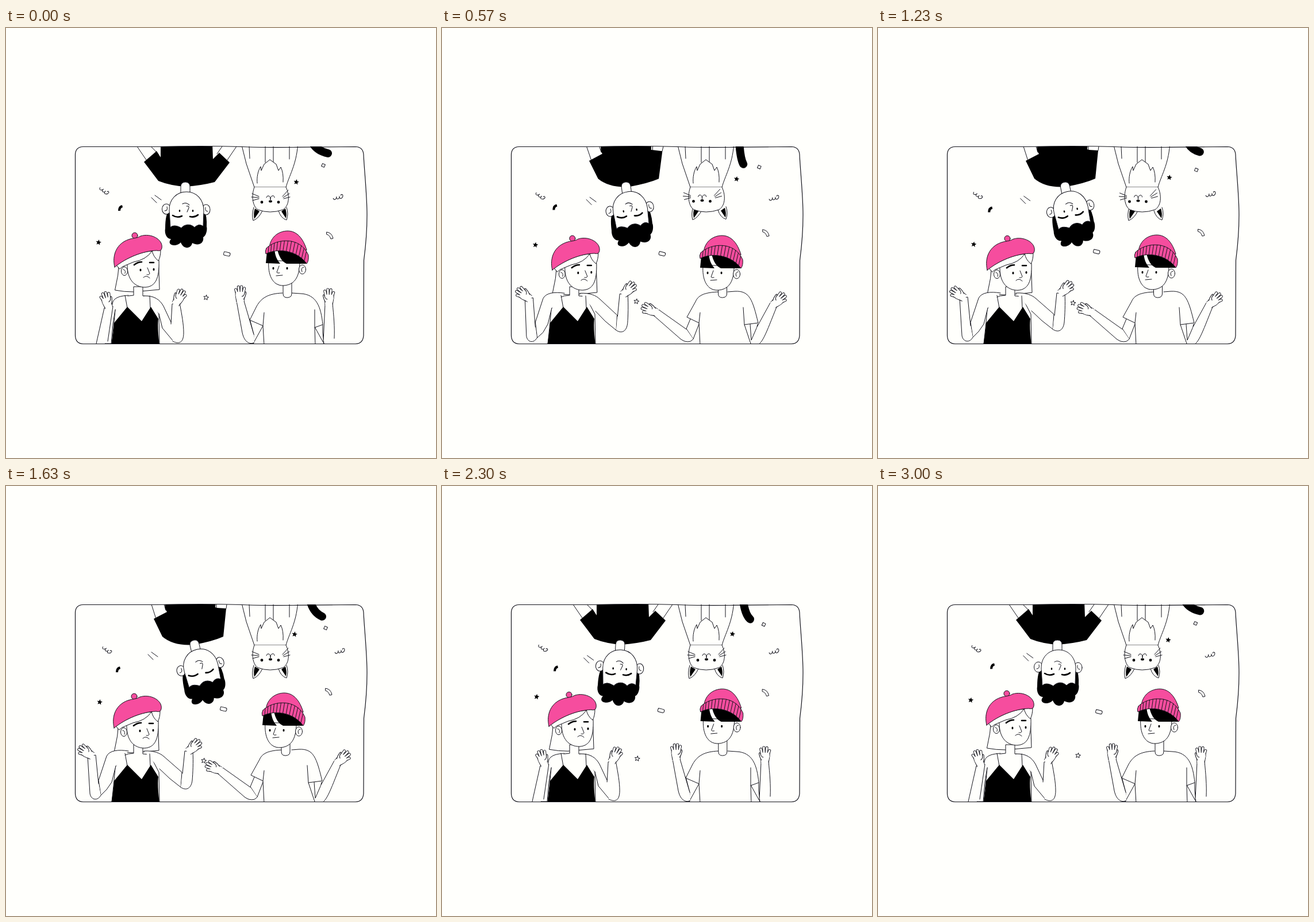
An HTML page that plays this animation: 748 px wide and 748 px high, repeating every 3030 ms.

```html
<!DOCTYPE html>
<html lang="en">
<head>
<meta charset="utf-8">
<title>Shrugging friends</title>
<style>
html, body { margin: 0; width: 100%; height: 100%; overflow: hidden; background: #fffffc; }
svg { display: block; width: 100vw; height: 100vh; }
.ln { fill: none; }
.sk { fill: #fffffc; }
.bk { fill: #000; stroke: none; }
.pk { fill: #f64d9e; }
.brow { fill: none; stroke: #000; stroke-width: 2.6; }
</style>
</head>
<body>
<svg viewBox="0 0 748 748" stroke="#14141c" stroke-width="1" stroke-linecap="round" stroke-linejoin="round">
<defs><clipPath id="panel"><rect x="120" y="206" width="510" height="343.500" rx="14"/></clipPath></defs>
<g id="scene" clip-path="url(#panel)"></g>
<path class="ln" stroke-width="1.2" d="M134 206.500H262Q340 204.500 410 206.500Q440 208 500 207.500L608 206.500Q621 207 622 220C623 245 628 290 628 325C628 360 625 385 622.500 404L622 535Q621 549 608 549.500H134Q121 549 120.500 535V220Q121 207 134 206.500Z"/>
</svg>
<script>
const LOOP = 3030;
const scene = document.getElementById('scene');
const $ = id => document.getElementById(id);
const p = (cls, d, id = '') => `<path class="${cls}" ${id && `id="${id}"`} d="${d}"/>`;
const dot = (x, y, rx, ry = rx, cls = 'bk') => `<ellipse class="${cls}" cx="${x}" cy="${y}" rx="${rx}" ry="${ry}"/>`;
const g = (id, inner) => `<g id="${id}">${inner}</g>`;

// Paths with two poses: [resting, shrugging]
const poses = {
  topArms: ['M228 206L245 231M252 206L262 216M376 206L367 219M401 206L384 231',
            'M253 206L261 231M275 206L278 216M366 206L366 212M384 206L383 213'],
  topShirt: ['M269 200L359 200L360 228L371 217L389 234L363 268Q340 274 312 276Q285 274 265 266L240 233L262 214L269 225Z',
             'M276 200L365 200L364 211L367 212L383 213L378 262Q360 270 328 276Q292 279 272 262L257 231L280 219L277 214Z'],
  galUpL: ['M213 465C200 466 190 468 186 476L178 510L172 549L183 549L186 515L190 490',
           'M213 461C195 458 180 460 175 470L161 512L165 538L175 528L184 515L191 487'],
  galForeL: ['M177 545L186 484L171 487L157 549C157 553 160 556 166 553',
             'M161 518L156 468L142 470L146 535C148 547 160 548 165 538'],
  galUpR: ['M240 466C258 465 268 473 274 484L289 516L292 546L272 522L266 497',
           'M240 461C258 460 268 465 274 470L306 498L304 524L285 509L267 492'],
  galForeR: ['M287 515L289 480L302 478C306 500 309 515 309 530C309 549 300 550 290 545',
             'M307 500L311 461L325 462C326 480 325 500 324 512C322 528 312 530 304 524'],
  boyUpL: ['M424 506L431 533L430 549L447 518', 'M433 504L425 523L437 541L447 515'],
  boyForeL: ['M431 533L414 475L401 475L411 530C415 548 425 551 432 547',
             'M425 524L377 490L367 499L415 541C423 547 432 548 437 541'],
  boyUpR: ['M551 516L551 530L553 549L537 520', 'M549 515L548 520L538 543L536 515'],
  boyForeR: ['M552 545L555 480L568 479C570 500 572 520 571 540C570 552 558 556 552 549',
             'M548 520L571 478L583 483L562 535C558 549 545 554 538 543'],
  boyShirt: ['M481 461C455 462 444 470 436 484L424 508L447 518L449 552L538 552L537 521L551 516C548 485 540 463 512 462L497 461',
             'M481 459C458 460 446 464 441 476L426 503L447 513L449 552L538 552L526 516L550 513C540 472 535 457 510 458L497 459'],
  boySides: ['M449 495L447 518M537 490L537 521', 'M449 495L447 513M524 486L526 516']
};
// Hands: wrist x, wrist y, angle for both poses, and the side of the thumb
const hands = {
  galHandL: [[178.500, 485, -18], [149, 469, -58], 1],
  galHandR: [[295.500, 479, 30], [318, 461, 50], -1],
  boyHandL: [[407.500, 475, -1], [372, 494.500, -68], 1],
  boyHandR: [[561.500, 480, 2], [577, 481, 49], -1]
};
const move = id => p('sk', poses[id][0], id);

function hand(id) {
  const fingers = [[-6, -22], [-2.200, -26.500], [2, -27], [6, -24]]
    .map(([x, y]) => `M${x * 0.9} -13L${x * 1.250} ${y + 2}`).join('');
  const inner =
    `<path d="${fingers}" fill="none" stroke-width="5"/>` +
    `<path d="${fingers}" fill="none" stroke="#fffffc" stroke-width="3.200"/>` +
    p('sk', 'M-6.500 1C-7 -4 -9 -8 -8 -16M8 -15C8 -10 7 -5 6.500 1') +
    `<path stroke="none" fill="#fffffc" d="M-6 3L-6 -2L-7.800 -9L-7.300 -16L7.300 -16L7.300 -9L6 3Z"/>` +
    p('sk', 'M6 -3Q9 -7 10.500 -14Q10 -18 8 -14Q7 -9 3 -8');
  return g(id, `<g transform="scale(${hands[id][2]} 1)">${inner}</g>`);
}

function bez(a, u) {
  const v = 1 - u;
  const at = i => (v * v * v * a[i] + 3 * v * v * u * a[i + 2] + 3 * v * u * u * a[i + 4] + u * u * u * a[i + 6]).toFixed(1);
  return at(0) + ' ' + at(1);
}

function ribs() {
  let d = '';
  for (let i = 1; i < 14; i++) {
    d += 'M' + bez([453, 383, 470, 366, 512, 362, 526, 395], i / 14) +
         'L' + bez([452, 393, 470, 383, 505, 385, 523, 410], i / 14);
  }
  return d;
}

function star(r) {
  const pts = [];
  for (let i = 0; i < 10; i++) {
    const a = i * Math.PI / 5 - 1.400, q = i % 2 ? r * 0.45 : r;
    pts.push((q * Math.cos(a)).toFixed(1) + ' ' + (q * Math.sin(a)).toFixed(1));
  }
  return 'M' + pts.join('L') + 'Z';
}

// Confetti: class, shape, positions at the key times
const squiggle = 'M-9 1Q-8 5 -5 3Q-3 1 -3 -1Q-4 4 0 3Q3 1 2 -1Q2 4 5 3Q9 1 8 -3Q5 -5 5 -2';
const keyTimes = [0, 330, 830, 1630, 2070, 2570];
const bits = [
  ['bk', star(5), [161, 373, 157, 378, 168, 376, 163, 376, 162, 369, 167, 366]],
  ['bk', star(5), [505, 268, 511, 264, 512, 262, 502, 258, 505, 255, 505, 262]],
  ['ln', star(4.600), [348, 469, 343, 473, 335, 478, 344, 478, 339, 477, 342, 471]],
  ['ln', squiggle, [171, 283, 171, 287, 172, 295, 176, 285, 177, 282, 174, 282], 42],
  ['ln', squiggle, [578, 294, 579, 298, 577, 292, 581, 287, 579, 288, 577, 288], -8],
  ['bk', 'M-4 5Q-4 -4 3 -5L4 -1Q0 0 0 5Z', [199, 313, 197, 312, 196, 312, 195, 319, 197, 318, 199, 316]],
  ['ln', 'M-5 -3H4Q6 -3 6 0T4 3H-4Q-6 3 -5 -3Z', [384, 393, 383, 394, 382, 391, 378, 388, 378, 391, 384, 390], 14],
  ['ln', 'M-3 -2L2 -3L3 2L-2 3Z', [552, 239, 552, 239, 552, 245, 556, 247, 559, 243, 559, 239], 35],
  ['ln', 'M-5 -6Q4 -5 6 5L2 6Q0 -1 -5 -2Z', [563, 361, 563, 359, 563, 355, 561, 358, 562, 360, 563, 359]],
  ['ln', 'M-9 -3L0 6M-3 -7L8 1', [262, 298, 262, 299, 258, 303, 256, 296, 256, 300, 256, 303]]
];

scene.innerHTML =
  bits.map((b, i) => g('bit' + i, p(b[0], b[1]))).join('') +
  // Tail and cat
  `<path id="tail" fill="none" stroke="#000" stroke-width="14"/>` +
  p('sk', 'M410 204L418 236L432 277L487 277C492 258 505 238 507.500 204') +
  p('ln', 'M423 206L424 227M451 206V234M465 206V234M493 206V228') +
  p('sk', 'M437 270C436 260 438 249 443 241L444 248L449 237L459 229L470 237L474 248L478 242Q483 252 482 268') +
  g('catEars',
    p('sk', 'M431 312Q427 325 430 335Q440 331 446 318') + p('bk', 'M433 314Q430 323 432 332L441 319Z') +
    p('sk', 'M474 318Q478 331 488 334Q492 323 488 312') + p('bk', 'M479 319L487 331Q489 323 486 314Z')) +
  p('sk', 'M432 277C427 290 428 309 438 316Q459 324 482 316C494 308 493 289 487 277') +
  g('catFace',
    dot(445, 303, 2.400) + dot(474, 303, 2.400) + dot(460, 301.500, 3, 2) +
    p('ln', 'M453 295Q454 291 457 292Q460 293 460 299Q460 293 463 292Q467 291 467 295') +
    p('ln', 'M428 288L440 293M427 294L440 295M429 300L440 297M481 293L491 282M482 295L493 288M483 297L494 294')) +
  // Upside-down friend
  move('topArms') + p('bk', poses.topShirt[0], 'topShirt') +
  g('topHead',
    p('sk', 'M304 290V276Q304 268 312 268Q320 268 320 276V290') +
    p('bk', 'M284 316Q277 324 277 348C275 360 281 367 287 367C278 378 296 382 304 373C309 386 322 384 324 374C335 380 345 374 343 364C350 360 350 347 349 346Q350 326 344 316Z') +
    dot(279, 315, 7.500, 9, 'sk') + dot(348, 316, 7, 9, 'sk') +
    p('sk', 'M284 318C283 298 297 285 314 285C332 285 344 299 344 318L343 345C338 341 333 342 328 347C320 339 310 342 305 348C298 344 291 342 286 347Z') +
    p('ln', 'M276 318Q282 318 280 311M351 319Q346 319 347 312M314 310Q319 309 318 313L315 320M307 306Q313 302 319 308') +
    p('brow', 'M290 326Q298 331 306 327M320 328Q328 330 334 325') +
    g('topEyes', dot(302, 318, 1.300, 2) + dot(325, 318, 1.300, 2))) +
  // Friend with the beret
  g('galHair', p('sk', 'M197 405Q196 430 189.500 456Q205 459 222 459L245 457L267 455L265 395Z')) +
  p('sk', 'M213 466L222 465V450H238V466L250 467L266 498L267 550H184L188 512L190 490L197 472Z', 'galTorso') +
  move('galUpL') + move('galUpR') +
  p('ln', 'M207 465L211 487M250 466L251 487') +
  p('bk', 'M211 485L236 510L252 485L265 506Q263 520 267 552H183Q187 530 188 513Z') +
  move('galForeL') + move('galForeR') + hand('galHandL') + hand('galHandR') +
  g('galHead',
    p('sk', 'M211 410C210 438 224 451 242 451C260 450 267 436 266 404L255 388Z') +
    dot(206, 423, 5.500, 7.500, 'sk') + p('ln', 'M204 420Q209 421 207 427') +
    p('sk', 'M192 412C215 398 235 389 254 388Q244 403 222 407Q210 412 203 415L198 419Z') +
    p('sk', 'M254 387Q256 398 265 405Q269 398 269 386Z') +
    p('brow', 'M223 412Q229 407 236 407M250 408L257 408') +
    dot(234, 421, 1.500, 2.200) + dot(257, 420, 1.500, 2.200) +
    p('ln', 'M246 417L250 427Q249 430 245 429M239 434Q244 429 250 435') +
    dot(224, 361, 5, 5, 'pk') +
    p('pk', 'M189 416C184 394 193 375 213 368C221 365 228 366 234 362C252 356 274 368 271 383Q270 389 262 387C238 388 210 399 189 416Z')) +
  // Friend with the knitted cap
  move('boyUpL') + move('boyUpR') + move('boyForeL') + move('boyForeR') +
  hand('boyHandL') + hand('boyHandR') +
  move('boyShirt') + move('boySides') +
  `<path id="boyNeck" class="sk" d="M482 440V462Q482 469 489 469Q497 469 497 462V440"/>` +
  g('boyHead',
    p('sk', 'M457 405C455 428 463 449 483 448C500 447 511 436 511 406Z') +
    dot(515.500, 420, 6, 8, 'sk') + p('ln', 'M518 416Q512 417 515 424') +
    p('bk', 'M454 388L452 409L477 410C471 403 468 396 467 384Z') +
    p('bk', 'M472 384C474 398 481 407 488 410L522 410L526 398L500 384Z') +
    dot(465, 418, 1.500, 2.200) + dot(489, 418, 1.500, 2.200) +
    p('ln', 'M475 414L471 425Q472 427 476 426M470 431L481 430') +
    p('pk', 'M458 382C460 362 476 353 490 353C506 353 517 366 523 386Z') +
    p('pk', 'M453 383C470 366 512 362 526 395Q527 405 523 410C505 385 470 383 452 393Q450 388 453 383Z') +
    p('ln', ribs())) +
  g('burst', p('ln', 'M418 410Q426 412 428 419Q421 417 418 410ZM431 400Q436 403 436 410Q431 406 431 400ZM405 428Q413 427 418 432Q410 433 405 428Z'));

function mix(a, b, k) {
  const to = b.match(/-?\d+(\.\d+)?/g);
  let i = 0;
  return a.replace(/-?\d+(\.\d+)?/g, n => (+n + (to[i++] - n) * k).toFixed(2));
}

// Eased value from rows of [time, ...values]
function ease(rows, t) {
  let i = 0;
  while (i < rows.length - 2 && t >= rows[i + 1][0]) i++;
  const a = rows[i], b = rows[i + 1];
  const u = Math.min(1, Math.max(0, (t - a[0]) / (b[0] - a[0])));
  const s = u * u * (3 - 2 * u);
  return a.slice(1).map((v, j) => v + (b[j + 1] - v) * s);
}

// Smooth closed curve through values at given times
function drift(times, vals, period, t) {
  const n = times.length;
  const T = i => times[(i + n) % n] + Math.floor(i / n) * period;
  const V = i => vals[(i + n) % n];
  let i = n - 1;
  while (i > 0 && t < times[i]) i--;
  const d = T(i + 1) - T(i), u = (t - T(i)) / d;
  const m0 = (V(i + 1) - V(i - 1)) / (T(i + 1) - T(i - 1)) * d;
  const m1 = (V(i + 2) - V(i)) / (T(i + 2) - T(i)) * d;
  const u2 = u * u, u3 = u2 * u;
  return (2 * u3 - 3 * u2 + 1) * V(i) + (u3 - 2 * u2 + u) * m0 + (3 * u2 - 2 * u3) * V(i + 1) + (u3 - u2) * m1;
}

const tracks = {
  top: [[0, 0], [330, 0.2], [620, 1], [1680, 1], [2030, 0], [LOOP, 0]],
  gal: [[0, 0], [340, 0], [620, 1], [1880, 1], [2320, 0], [LOOP, 0]],
  boy: [[0, 0], [80, 0], [430, 1], [1680, 1], [2000, 0], [LOOP, 0]],
  topHead: [[0, 0, 0], [330, -2, 0.3], [650, 10, -9], [830, 11, -10], [1630, 16, -13], [2040, -4, 6.500], [2100, -4, 6.500], [2500, 0, 0], [LOOP, 0, 0]],
  galHead: [[0, 0, 0], [330, 1.800, 2.500], [650, 3, 5.500], [830, 3, 5.500], [1630, -1, 5], [2070, -3, 6.500], [2450, -3, 0], [2600, -3, 0], [LOOP, 0, 0]],
  boyHead: [[0, 0, 0], [80, 0, 0], [330, -2, 9], [830, -4, 7], [1630, -6, 7], [2000, -4, 0], [2570, -1, 0], [LOOP, 0, 0]],
  cat: [[0, 0, 0], [80, 0, 0], [330, 1, -2.500], [830, 1, 0], [1250, 1, 0], [1500, 0, 0], [LOOP, 0, 0]],
  blink: [[0, 1], [1540, 1], [1600, 0], [1660, 0], [1720, 1], [LOOP, 1]]
};
const set = (id, tf) => $(id).setAttribute('transform', tf);

function draw(t) {
  const at = name => ease(tracks[name], t);
  const part = { top: at('top')[0], gal: at('gal')[0], boy: at('boy')[0] };

  for (const id in poses) $(id).setAttribute('d', mix(...poses[id], part[id.slice(0, 3)]));
  for (const id in hands) {
    const [a, b] = hands[id], k = part[id.slice(0, 3)];
    const [x, y, r] = a.map((v, i) => v + (b[i] - v) * k);
    set(id, `translate(${x} ${y}) rotate(${r})`);
  }

  const [tx, turn] = at('topHead');
  set('topHead', `translate(${tx} 0) rotate(${turn} 312 276)`);
  set('topEyes', `translate(0 318) scale(1 ${at('blink')[0]}) translate(0 -318)`);
  const gal = at('galHead');
  set('galHair', `translate(${gal})`);
  set('galHead', `translate(${gal})`);
  set('boyHead', `translate(${at('boyHead')})`);
  set('boyNeck', `translate(${at('boyHead')[0] * 0.5} 0)`);

  const [look, lift] = at('cat');
  set('catFace', `translate(${-7.500 * look} ${-look + lift * 0.4})`);
  set('catEars', `translate(${6 * look} ${lift})`);

  // The tail swings twice per loop
  const phase = t / LOOP * 2 % 1;
  const swing = vals => drift([0, 0.076, 0.218, 0.366, 0.548, 0.696], vals, 1, phase);
  const ex = swing([560, 550, 535, 524, 539, 556]);
  const ey = swing([218, 227, 234, 237, 230, 217]);
  const rx = swing([533, 529, 522, 517, 526, 540]);
  $('tail').setAttribute('d', `M${rx} 199Q${rx + (ex - rx) * 0.25} ${199 + (ey - 199) * 0.75} ${ex} ${ey}`);

  bits.forEach((b, i) => {
    const [x, y] = [0, 1].map(c => drift(keyTimes, b[2].filter((_, j) => j % 2 === c), LOOP, t));
    set('bit' + i, `translate(${x} ${y}) rotate(${b[3] || 0})`);
  });
  $('burst').style.display = t > 220 && t < 480 ? '' : 'none';
}

const start = performance.now();
function tick() {
  draw((performance.now() - start) % LOOP);
  requestAnimationFrame(tick);
}
tick();
</script>
</body>
</html>
```
